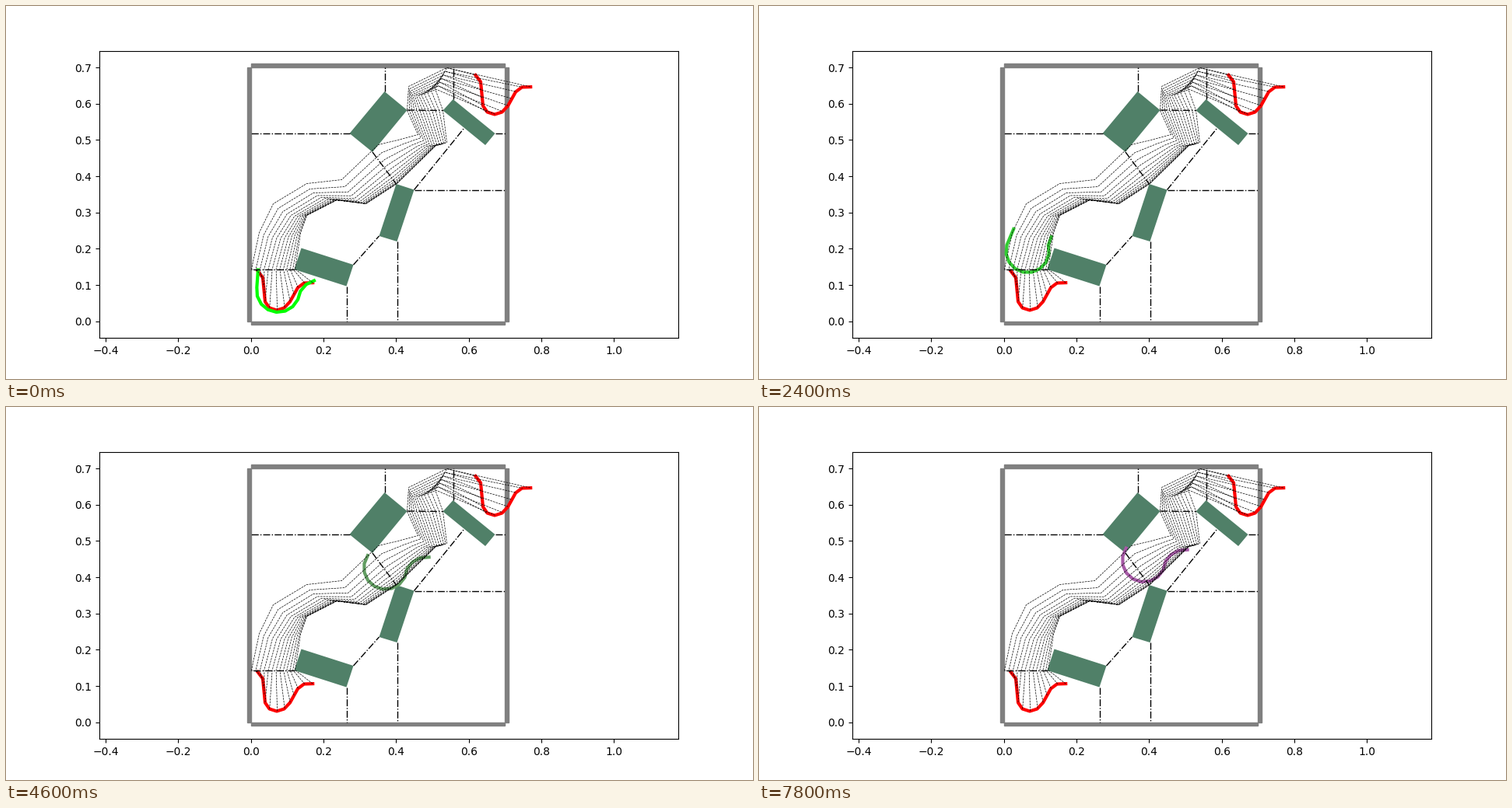
Recreate the animation shown at these times as a matplotlib script. Size 960 by 480 pixels, loop 8000 ms.

```python
import numpy as np
import matplotlib.pyplot as plt
from matplotlib.animation import FuncAnimation
from matplotlib.patches import Polygon, Rectangle

FRAMES, STEP = 40, 200
NODES = 13
SCALE = 369.6 / 0.792                          # pixels per data unit
ORIGIN = np.array([492 - 0.38 * SCALE, 405.73])  # data origin in pixels
LINK, BEND = 11.3, 23.5                        # cable link: length, turn in degrees


def data(points):
    """Stage pixels to data units."""
    return (np.asarray(points, float) + 0.5 - ORIGIN) / [SCALE, -SCALE]


def plot(points, *args, **kw):
    return ax.plot(*data(points).T, *args, **kw)[0]


def resample(points):
    """Evenly spaced nodes along a polyline."""
    p = np.asarray(points, float)
    s = np.append(0, np.cumsum(np.hypot(*np.diff(p, axis=0).T)))
    at = np.linspace(0, s[-1], NODES)
    return np.stack([np.interp(at, s, c) for c in p.T], -1)


def spread(a, m, b, power=1.0):
    """Nodes on a quadratic curve from a to b, crowded towards b."""
    u = 1 - (1 - np.linspace(0, 1, NODES)[:, None]) ** power
    a, m, b = map(np.array, (a, m, b))
    return (1 - u) ** 2 * a + 2 * u * (1 - u) * m + u ** 2 * b


fig, ax = plt.subplots(figsize=(9.6, 4.8), dpi=100)
half = 744 / SCALE / 2
ax.set_xlim(0.38 - half, 0.38 + half)
ax.set_ylim(-0.046, 0.746)

# Room and obstacles
for xy, w, h in [((-0.01, 0), 0.01, 0.7), ((0.7, 0), 0.01, 0.7),
                 ((0, -0.01), 0.7, 0.01), ((0, 0.7), 0.7, 0.01)]:
    ax.add_patch(Rectangle(xy, w, h, color="gray"))

BLOCKS = [
    [(486, 109.5), (515, 133.5), (470.5, 187.5), (441, 163.5)],
    [(574, 119.5), (628, 163.5), (615.5, 178.5), (561, 134)],
    [(501, 228.5), (524, 236), (502, 302.5), (479, 295.5)],
    [(379, 311), (446, 332.5), (437, 360), (370, 338.5)],
]
for block in BLOCKS:
    ax.add_patch(Polygon(data(block), facecolor="#508068", edgecolor="none"))
a, b, c, d = BLOCKS

# Start and goal shapes
shift = SCALE * np.array([0.6, -0.54])
start = np.array([(323, 340.5), (329.5, 349), (332.5, 380), (338, 388), (347.5, 391),
                  (357, 388), (364.5, 380), (374.5, 362), (382.5, 356), (393.7, 355.6)])
for shape in (start, start + shift):
    plot(shape, color="red", lw=3)

cable = plot(start, lw=3)

# Gaps between obstacles, and from obstacle corners straight to the walls
LEFT, RIGHT, TOP, FLOOR = 314.5, 641, 78.5, 405
gaps = [(a[1], b[3]), (a[2], c[0]), (c[1], (588, 157)), (d[1], c[3])]
gaps += [(p, (x, p[1])) for p, x in
         [(a[3], LEFT), (d[3], LEFT), (b[1], RIGHT), (c[1], RIGHT)]]
gaps += [(p, (p[0], y)) for p, y in
         [(a[0], TOP), (b[0], TOP), (c[2], FLOOR), (d[2], FLOOR)]]
for gap in gaps:
    plot(gap, "k-.", lw=1)

# One track per node, through the gaps, folded in half before the goal
nodes = resample(start)
fold = 1 - np.abs(np.linspace(-1, 1, NODES))[:, None]
stages = [
    nodes,
    spread((315, 338), (343, 338), (371, 338), 1.2),
    spread((325, 291), (348, 305), (378, 292), 1.5),
    spread((343, 254), (362, 275), (386, 269), 2),
    spread((386, 228), (395, 249), (425, 249), 2.3),
    spread((431, 223), (441, 250), (462, 254), 2.3),
    spread((478, 178), (490, 207), (502, 228), 2.3),
    spread((503, 172), (530, 185), (553, 178), 2.3),
    spread((529, 165), (546, 186), (566, 175), 1.3),
    spread((515, 134), (532, 134), (561, 134)),
    spread((517, 103), (520, 125), (551, 106)),
    (566, 79) + fold * [-13, 28],
    nodes + shift,
]
for track in np.stack(stages, 1):
    plot(track, "k--", lw=0.5)

# Cable keys: step, middle node x and y, link that lies level,
# link where the bend reverses, link where the bend begins
KEYS = np.array([
    (0, 347, 393.5, 5.7, 8.9, 1.7),
    (8, 343, 381.5, 6.0, 12, 2.7),
    (10, 340, 368, 6.0, 11, 2),
    (12, 339, 342, 6.0, 10, 1.2),
    (16, 384, 273, 6.6, 9, 0),
    (18, 431, 264, 6.2, 8.6, 0),
    (20, 466, 248, 5.5, 8.3, 0),
    (23, 495, 233, 4.8, 8, 0),
    (31, 499.5, 227, 4.8, 8, 0),
    (39, 502, 223.5, 4.8, 8, 0),
])


def pose(k):
    """Chain of equal links: a steady bend that turns back near its end."""
    x, y, level, turn, begin = [np.interp(k, KEYS[:, 0], col) for col in KEYS.T[1:]]
    j = np.arange(NODES - 1)
    angle = np.radians(BEND * (level - np.clip(j, begin, turn) + np.maximum(j - turn, 0)))
    links = LINK * np.stack([np.cos(angle), np.sin(angle)], -1)
    chain = np.vstack([(0, 0), np.cumsum(links, axis=0)])
    return chain - chain[NODES // 2] + (x, y)


def draw(k):
    cable.set_data(*data(pose(k)).T)
    t = k / 60
    cable.set_color((t, 1 - t, t))
    return cable,


anim = FuncAnimation(fig, draw, frames=FRAMES, interval=STEP,
                     repeat=True, repeat_delay=0)
plt.show()
```
